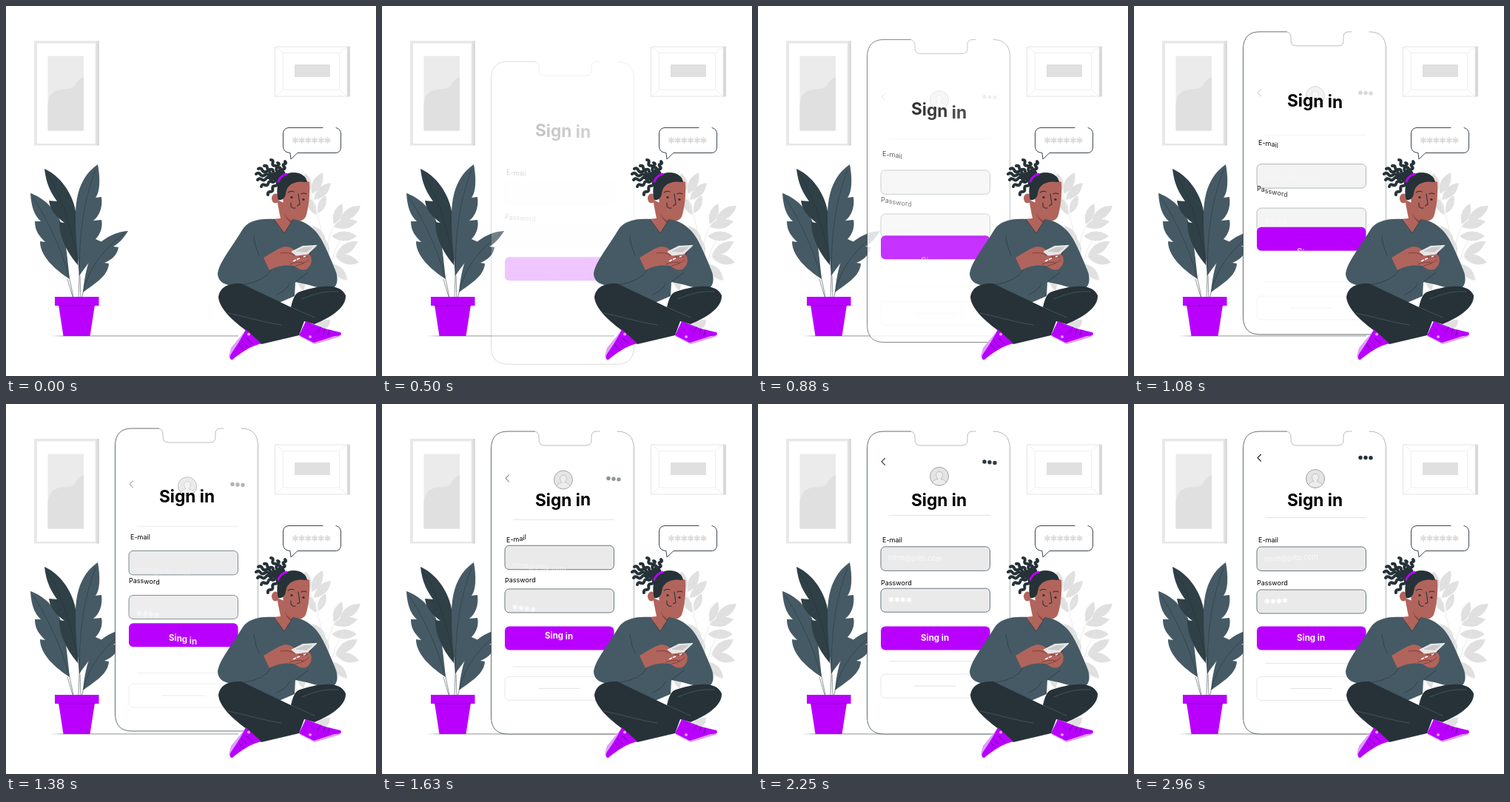
Write an HTML page that moves like this. It is 500 by 500 pixels and loops after 3 s.

```html
<!DOCTYPE html>
<html lang="en">
<head>
<meta charset="utf-8">
<title>Sign in</title>
<style>
html, body { margin: 0; width: 100%; height: 100%; overflow: hidden; background: #fff; }
svg { display: block; width: 100vw; height: 100vh; }
text { font-family: Inter, "Open Sans", sans-serif; white-space: pre; }
.ink { fill: none; stroke: #263238; stroke-width: .7; stroke-linecap: round; stroke-linejoin: round; }
.skin { fill: #b1645c; }
.slate { fill: #455a64; }
.dark { fill: #263238; }
.pop { fill: #b900ff; }
</style>
</head>
<body>
<svg viewBox="0 0 500 500">
  <!-- wall frames -->
  <path fill="#e8e8e8" d="M38 47h88v141.500h-88z"/>
  <path fill="#dadada" d="M122.500 47h3.500v141.500h-3.500z"/>
  <path fill="#fff" d="M42 50.500h78.500v135.500h-78.500z"/>
  <path fill="#ebebeb" d="M56.500 67.500h48.500v101h-48.500z"/>
  <path fill="#e0e0e0" d="M56.500 168.500V132C58 119 66 113 76 112.500C86 112 90 112 94 106C98 99 102 97 105 96V168.500Z"/>
  <g fill="none" stroke="#e4e4e4">
    <path d="M363.500 55h98v67h-98z"/>
    <path stroke="#efefef" d="M374.500 63.500h76v49.500h-76zM364 55l10.500 8.500M364 122l10.500-9M461 55l-10.500 8.500M461 122l-10.500-9"/>
  </g>
  <path fill="#d9d9d9" d="M461 54.500h4v68h-4z"/>
  <path fill="#e0e0e0" d="M390 79h48v17h-48z"/>

  <path d="M60 446L80 445.200H314V446.400H80Z" fill="#a5a9ab"/>

  <!-- potted plant -->
  <path class="slate" d="M33 253C48 258 72 275 78 305C82 330 84 350 86 369C66 356 46 338 46 318L53 319C45 311 39 304 39 291L47 291C38 283 34 270 33 253Z"/>
  <path fill="#2f4047" d="M52 220C68 227 86 245 93 272C97 290 98 320 97 350C80 330 72 310 72 292L79 293C70 286 60 278 58 263L69 264C59 250 54 238 52 220Z"/>
  <path class="slate" d="M124 214C104 228 94 250 94 285C94 320 98 345 99 365C112 345 126 332 130 319L121 315C128 308 131 298 129 289L118 290C126 284 131 272 129 258L121 259C128 250 127 230 124 214Z"/>
  <path class="slate" d="M165 304C150 305 135 311 122 325C111 340 106 365 104 387C120 375 138 365 139 348L133 347C142 343 150 338 152 326L145 325C154 320 160 312 165 304Z"/>
  <path class="ink" stroke-width=".5" d="M36 258C54 285 74 325 86 369L91 393M56 227C74 255 90 300 97 350M121 222C104 265 99 310 99 365L98 393M160 307C135 327 113 350 104 387L103 393M83 369L90 393M100 365L101 393" style="stroke-width:.5"/>
  <path class="pop" d="M71 404H120L113.500 446H77.500Z"/>
  <path class="pop" d="M66 393h59.500v12h-59.500z"/>
  <path stroke="#8f00c8" d="M71 405H120"/>

  <!-- sign-in screen -->
  <g data-k="1">
    <path fill="#fff" d="M147.500 60Q148 37 170 37H206Q212 38 212 44V48Q212 56 219 56H276Q283 56 283 49V44Q283 37 290 37H318Q340 37 340.500 60V423Q340 446 318 446H170Q148 446 147.500 423Z"/>
    <path class="ink" d="M294 37H290Q283 37 283 44V49Q283 56 276 56H219Q212 56 212 48V44Q212 38 206 37" opacity=".45"/>
    <path class="ink" d="M206 37H170Q148 37 147.500 60V423Q148 446 170 446H318Q340 446 340.500 423"/>
    <path class="ink" d="M318 37Q340 37 340.500 60V423" opacity=".5"/>
  </g>
  <g data-k="1.52" data-a="44">
    <rect x="166" y="193" width="147.500" height="32.500" rx="6" fill="#eaeaea" stroke="#455a64" stroke-width=".8"/>
  </g>
  <g data-k="1.57" data-a="44">
    <rect x="166" y="251" width="147.500" height="32" rx="6" fill="#eaeaea" stroke="#455a64" stroke-width=".8"/>
  </g>
  <g data-k="1.02">
    <rect class="pop" x="166" y="300.500" width="147.500" height="32" rx="6"/>
  </g>
  <g data-k="1.62" data-a="44">
    <rect x="166" y="368.500" width="147.500" height="32" rx="6" fill="none" stroke="#e6e6e6" stroke-width=".9"/>
    <path stroke="#e2e2e2" d="M211 384.500H268"/>
  </g>
  <path data-k="1.75" data-a="35" stroke="#e2e2e2" d="M177 153.500H314"/>
  <path data-k="1.8" data-a="35" stroke="#e6e6e6" d="M177 350.500H314"/>
  <g data-k="1.7" data-a="35">
    <circle cx="245" cy="101" r="12.500" fill="#e4e4e4" stroke="#7b8388" stroke-width=".7"/>
    <path fill="#ededed" stroke="#b5b5b5" stroke-width=".8" d="M236 109.500C237 106 240 105.500 243 104.500C239 100 240 94.500 245 94.500C250 94.500 251 100 247 104.500C250 105.500 253 106 254 109.500C249 114 241 114 236 109.500Z"/>
  </g>
  <path class="ink" data-k="2.28" style="stroke-width:1.2" d="M171.500 72.800L167 77.300L171.500 81.800"/>
  <circle class="dark" data-k="2.3" cx="306" cy="77" r="2.700"/>
  <circle class="dark" data-k="2.33" cx="313" cy="77" r="2.700"/>
  <circle class="dark" data-k="2.36" cx="320" cy="77" r="2.700"/>
  <text x="207" y="137.500" font-size="22.700" font-weight="700" data-k="1.02" data-end="1.09">Sign in</text>
  <text x="168" y="187" font-size="9" data-k="1.1" data-end="1.17">E-mail</text>
  <text x="166" y="245.300" font-size="9" data-k="1.17" data-end="1.3">Password</text>
  <text x="220" y="320.300" font-size="11.500" font-weight="700" fill="#fff" data-k="1.36" data-end="1.49">Sing in</text>
  <text x="176" y="213" font-size="9.500" fill="#fafafa" data-k="1.98" data-end="2.2" data-a="30">mine@pilto.com</text>
  <g id="pass" stroke="#fff" stroke-width="1.700"></g>

  <!-- speech bubble -->
  <path fill="#fff" d="M382 164.500H445Q452.500 165 452.500 172V191Q452 198.500 445 198.500H394L385 207L384 198.500Q375 198 374.500 190V172Q375 165 382 164.500Z"/>
  <path class="ink" style="stroke-width:.9" d="M428 164.500H382Q375 165 374.500 172V190Q375 198 384 198.500L385 207L394 198.500H445Q452 198.500 452.500 191V172Q452 166 446 164.500"/>
  <g id="stars" stroke="#dcdcdc" stroke-width="1.900"></g>

  <!-- plant behind -->
  <g id="leaves" fill="#e0e0e0"></g>
  <path fill="none" stroke="#ebebeb" d="M430 435C440 380 434 310 408 245M434 345C433 315 440 298 453 288M435 375C440 340 445 325 456 310M420 280L428 265"/>
  <path fill="#e0e0e0" d="M418 431C425 426 433 423 438 424C438 432 434 437 426 437Z"/>

  <!-- person -->
  <g id="locks" fill="none" stroke="#263238" stroke-width="4" stroke-linecap="round"></g>
  <path class="skin" d="M366 262L371 287L360 288L376 309L392 290L386 270Z"/>
  <path fill="#8f4a45" d="M376 280Q384 293 395 292L391 296Q380 293 376 280Z"/>
  <path class="skin" d="M374 246C384 233 398 233 410 238C411 255 409 273 405 285C400 293 390 293 380 286C375 280 374 266 374 246Z"/>
  <ellipse class="skin" cx="364" cy="260" rx="5" ry="6.500"/>
  <path class="dark" d="M368 262C363 242 370 226 388 225C400 225 406 231 407 238C398 237 389 237 383 243C376 249 380 257 374 261Q370 263 368 262Z"/>
  <path fill="none" stroke="#b900ff" stroke-width="3" d="M367.500 238C370 232 374 228 380 227"/>
  <path class="ink" style="stroke-width:1.100" d="M381 252Q385 249 389 251M399 254Q402 252 406 254M395 254L397 268L393.500 270M385 266Q384 274 391 273"/>
  <circle class="dark" cx="386" cy="258.500" r="1.600"/>
  <circle class="dark" cx="402" cy="261.500" r="1.600"/>

  <path class="slate" d="M362 288C340 287 326 291 319 303C304 328 288 346 286 362C287 375 300 380 318 377L362 404L390 392L391 373C410 376 428 384 441 382C449 378 449 366 445 357C436 335 428 315 418 304C408 294 400 290 388 288L376 307Z"/>
  <path class="dark" d="M287 393C289 380 300 374 318 375L385 407C388 394 391 388 397 386C412 381 450 370 459 391C460 408 438 421 417 430L403 426L396 445L345 457L328 441C305 425 288 408 287 393Z"/>
  <path class="ink" style="stroke:#60717a;stroke-width:.5" d="M300 415C325 420 345 427 372 431M385 407L417 421M400 396Q425 384 449 386"/>
  <path class="ink" style="stroke-width:.6" d="M362 288L376 307L388 288M319 377Q350 372 358 357M335 312Q336 325 342 337M415 322Q414 330 410 337M391 373L408 360M366 390Q378 385 384 375"/>

  <path class="skin" d="M348 340C360 333 370 326 378 325C386 326 389 329 391 332L409 335C415 340 413 349 409 353C404 359 396 357 390 351C380 350 368 350 356 357Z"/>
  <path fill="#e6e6e6" stroke="#fff" stroke-width=".8" d="M386 332L401 324.500L420 323.500L408 335L392 337Z"/>
  <path fill="#c9c9c9" d="M391 331.500L403 326L415 325.500L406 333Z"/>
  <path class="ink" style="stroke:#6e322f;stroke-width:.7" d="M371 334Q383 332 390 337M384 349Q393 345 402 347M392 351Q402 349 409 343M396 339H408"/>
  <path stroke="#fff" stroke-width="1.500" d="M388 345L392 343M393 342.500L397 341M402 339L405 338"/>

  <path fill="#dca0f5" d="M324 438L304 462L301 474L305 478Z"/>
  <path class="pop" d="M324 437L345 456C330 460 318 468 306 478C301 478 302 472 307 466C313 457 320 446 324 437Z"/>
  <path fill="#dca0f5" d="M396 446L417 457L451 447L453 443Z"/>
  <path class="pop" d="M405 426L431 436L452 441C455 445 450 446 444 446L416 455L396 445Z"/>
  <path class="ink" style="stroke:#4d006b;stroke-width:.7" d="M315 458L321 464M319 453L326 460M324 448L333 456M425 434L421 441M431 436L429 444M437 438L435 445"/>
  <circle fill="#dca0f5" cx="328" cy="443.500" r="2"/>
  <circle fill="#dca0f5" cx="411" cy="447" r="2"/>
</svg>
<script>
const PERIOD = 3000;
const $ = id => document.getElementById(id);

const star = (x, y, r) => {
  let d = "";
  for (let i = 0; i < 3; i++) {
    const a = Math.PI * (i / 3 + .5), c = r * Math.cos(a), s = r * Math.sin(a);
    d += `M${x - c} ${y - s}L${x + c} ${y + s}`;
  }
  return d;
};
for (let i = 0; i < 6; i++) $("stars").innerHTML += `<path d="${star(391 + i * 8.7, 181.5, 4.3)}"/>`;
for (let i = 0; i < 4; i++)
  $("pass").innerHTML += `<path data-k="${1.93 + i * .04}" data-a="35" d="${star(180 + i * 8, 266.5, 3.6)}"/>`;

// leaf: base point to tip
const leaf = ([x, y, u, v]) => {
  const w = .38, dx = (u - x) * w, dy = (v - y) * w, mx = (x + u) / 2, my = (y + v) / 2;
  return `<path d="M${x} ${y}Q${mx - dy} ${my + dx} ${u} ${v}Q${mx + dy} ${my - dx} ${x} ${y}"/>`;
};
$("leaves").innerHTML = [
  [413, 254, 428, 225], [411, 250, 404, 226], [416, 262, 439, 239], [419, 282, 407, 258],
  [422, 280, 432, 256], [443, 295, 454, 267], [451, 290, 479, 270], [442, 298, 475, 291],
  [440, 311, 474, 311], [446, 337, 475, 318], [445, 338, 477, 347], [440, 348, 461, 371],
  [434, 340, 429, 313], [432, 320, 414, 297], [402, 385, 396, 360]
].map(leaf).join("");

// wavy hair locks running out from the tie
$("locks").innerHTML = [[358, 208], [377, 210], [349, 216], [341, 220], [338, 227], [340, 235], [345, 244], [354, 255], [367, 212]]
  .map(([x, y]) => {
    const n = 6, dx = (x - 373) / n, dy = (y - 231) / n, len = Math.hypot(dx, dy);
    let d = "M373 231";
    for (let i = 0; i < n; i++) {
      const b = (i % 2 ? 3 : -3) / len;
      d += `q${dx / 2 - dy * b} ${dy / 2 + dx * b} ${dx} ${dy}`;
    }
    return `<path d="${d}"/>`;
  }).join("");

// rise with overshoot: [ms, progress]
const KNOTS = [[0, 0], [300, 0], [380, .08], [710, .53], [880, .83], [1000, 1], [1250, 1.085], [1380, 1.08], [1500, 1]];
const slope = i => {
  const a = KNOTS[i - 1], b = KNOTS[i + 1];
  return a && b ? (b[1] - a[1]) / (b[0] - a[0]) : 0;
};
function rise(t) {
  if (t >= 1500) return 1;
  const i = KNOTS.findIndex(k => k[0] > t) - 1;
  const [t0, p0] = KNOTS[i], [t1, p1] = KNOTS[i + 1], h = t1 - t0, s = (t - t0) / h, q = 1 - s;
  return p0 * (1 + 2 * s) * q * q + p1 * s * s * (3 - 2 * s)
    + h * s * q * (slope(i) * q - slope(i + 1) * s);
}
const fade = p => Math.max(0, Math.min(1, p));

// each part runs the same rise, slowed by k; letters spread from k to end
const parts = [], words = [];
document.querySelectorAll("[data-k]").forEach(el => {
  const { k, end, a = 50 } = el.dataset;
  if (!end) return parts.push({ el, k: +k, a: +a });
  const chars = [...el.textContent];
  el.textContent = "";
  words.push({ a: +a, letters: chars.map((c, i) => {
    const span = document.createElementNS(el.namespaceURI, "tspan");
    span.textContent = c;
    el.append(span);
    return { span, k: +k + (end - k) * i / (chars.length - 1) };
  }) });
});

function draw(t) {
  for (const { el, k, a } of parts) {
    const p = rise(t / k);
    el.setAttribute("transform", `translate(0 ${a * (1 - p)})`);
    el.setAttribute("opacity", fade(p));
  }
  for (const { a, letters } of words) {
    let last = 0;
    for (const { span, k } of letters) {
      const p = rise(t / k), y = a * (1 - p);
      span.setAttribute("dy", y - last);
      span.setAttribute("fill-opacity", fade(p));
      last = y;
    }
  }
}

const start = performance.now();
function tick() {
  draw((performance.now() - start) % PERIOD);
  requestAnimationFrame(tick);
}
tick();
</script>
</body>
</html>
```
